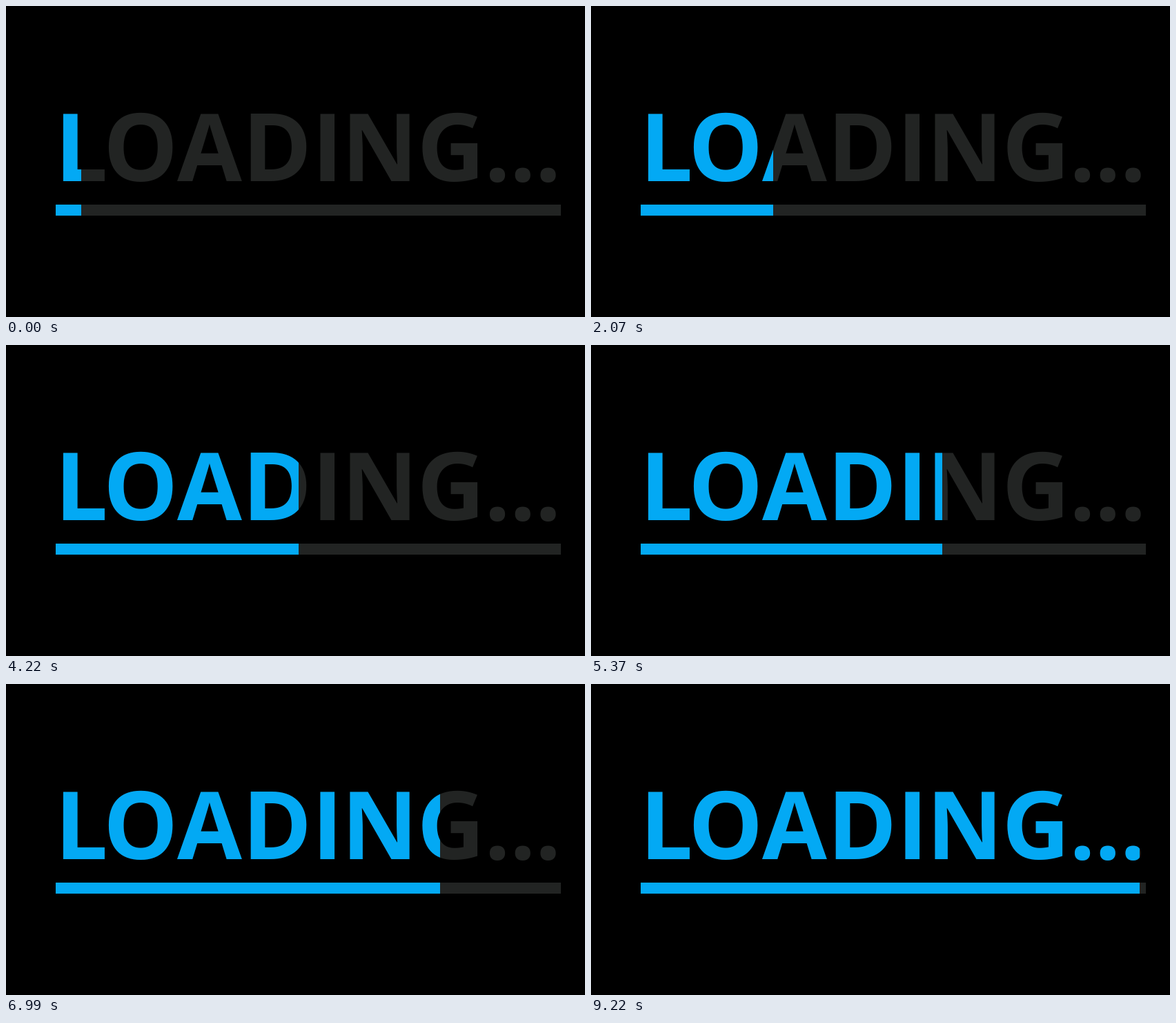
Animation, 839 px wide and 451 px high, one loop 9.3 s. Source, as an HTML page:

```html
<!DOCTYPE html>
<html lang="en">
<head>
<meta charset="utf-8">
<title>Loading</title>
<style>
  html, body { margin: 0; width: 100%; height: 100%; overflow: hidden; background: #000; }
  svg { display: block; width: 100%; height: 100%; }
  text { font: 700 136px "Open Sans", "Noto Sans", sans-serif; }
  .dots { font-size: 130px; }
</style>
</head>
<body>
<svg viewBox="0 0 839 451">
  <defs>
    <clipPath id="done"><rect id="fill" x="0" y="0" width="109" height="451"/></clipPath>
    <g id="art">
      <text y="254" x="70.8 141 248 342.5 443.3 486.3 595.5">LOADING<tspan class="dots" x="693.5 730.3 767.1" y="254.3">...</tspan></text>
      <rect x="72" y="288" width="732" height="16"/>
    </g>
  </defs>
  <use href="#art" fill="#222423"/>
  <g clip-path="url(#done)"><use href="#art" fill="#03a9f4"/></g>
</svg>
<script>
  const LOOP = 9300, STEPS = 120, STEP_MS = 1000 / 13, LEAD = 17;
  const START = 109.3, STEP_PX = 5.716;
  const fill = document.getElementById("fill");

  function draw(ms) {
    const step = Math.min(STEPS, Math.floor((ms % LOOP + LEAD) / STEP_MS));
    fill.setAttribute("width", Math.round(START + step * STEP_PX));
  }

  const began = performance.now();
  function tick() {
    draw(performance.now() - began);
    requestAnimationFrame(tick);
  }
  tick();
</script>
</body>
</html>
```
